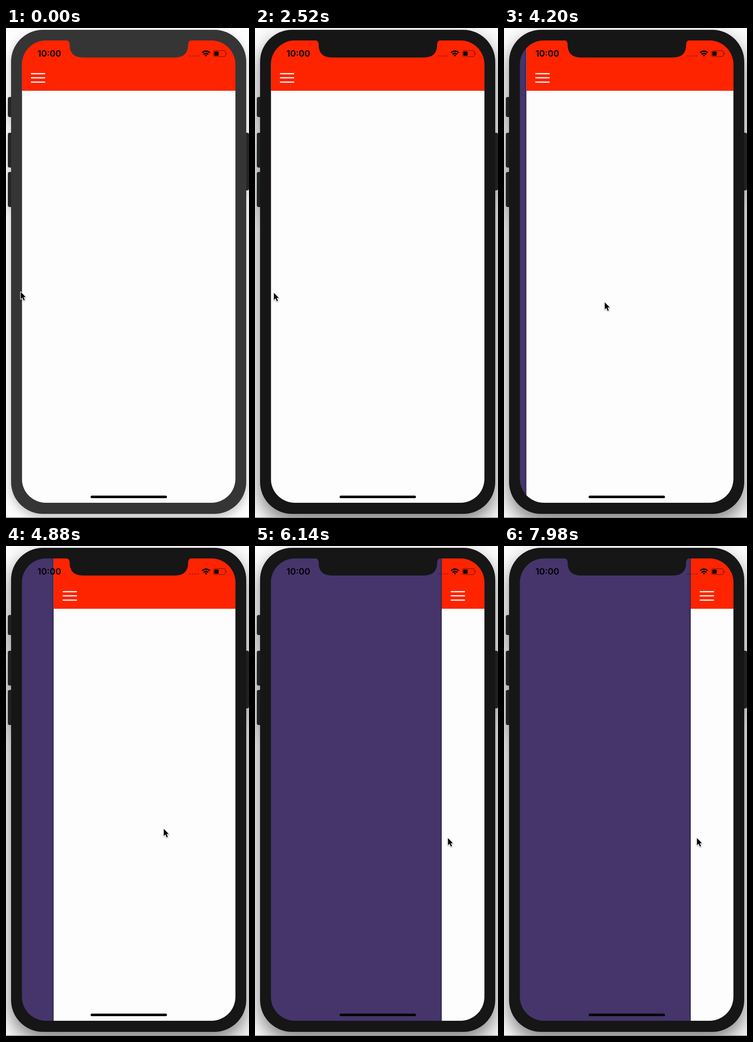
Recreate the animation shown at these times as an HTML page. Size 527 px wide and 1062 px high, loop 8 s.

```html
<!DOCTYPE html>
<html lang="en">
<head>
<meta charset="utf-8">
<title>Side menu drag</title>
<style>
html, body { margin: 0; width: 100%; height: 100%; overflow: hidden; background: #fdfdfd; }
svg { display: block; width: 100%; height: 100%; }
#phone { fill: #353535; filter: drop-shadow(0 8px 10px rgba(0, 0, 0, .24)); }
.active #phone { fill: #161616; filter: drop-shadow(0 18px 20px rgba(0, 0, 0, .5)); }
#buttons { fill: #242625; }
.active #buttons { fill: #202121; }
.active #notch { fill: #161616; }
#notch { fill: #353535; }
#page { filter: drop-shadow(0 0 2px rgba(0, 0, 0, .65)); }
#cursor { filter: drop-shadow(0 1px 1px rgba(0, 0, 0, .35)); }
text { font: 600 19px Inter, "Liberation Sans", sans-serif; }
</style>
</head>
<body>
<svg id="stage" viewBox="0 0 527 1062">
  <defs>
    <clipPath id="screen"><rect x="34.5" y="27" width="463" height="1002" rx="52"/></clipPath>
  </defs>

  <g id="phone">
    <g id="buttons">
      <rect x="4" y="149.5" width="14" height="43.5" rx="4"/>
      <rect x="4" y="227" width="14" height="75.5" rx="4"/>
      <rect x="4" y="312" width="14" height="76" rx="4"/>
      <rect x="513" y="227" width="14" height="125" rx="4"/>
    </g>
    <rect x="11" y="4" width="510" height="1049" rx="69"/>
  </g>

  <g clip-path="url(#screen)">
    <rect x="34" y="26" width="464" height="1004" fill="#45356b"/>
    <g id="page">
      <rect x="34.5" y="20" width="480" height="1020" fill="#fdfdfd"/>
      <rect x="34.5" y="20" width="480" height="116" fill="#fe2400"/>
      <path d="M54 99h31M54 108h31M54 117.3h31" stroke="#fff" stroke-width="2.6"/>
    </g>
  </g>
  <path id="notch" d="M128 26Q138 26 138 36Q138 64 167 64H366Q395 64 395 36Q395 26 405 26Z"/>

  <text x="94" y="62" text-anchor="middle">10:00</text>
  <path d="M398.5 60.5h20" stroke="#000" stroke-opacity=".22" stroke-width="4" stroke-linecap="round" stroke-dasharray="0 6.2"/>
  <g fill="none" stroke="#000" stroke-width="2.7">
    <path d="M425.2 53.6A12 12 0 0 1 442 53.6M428.4 57A7.4 7.4 0 0 1 438.8 57"/>
    <path d="M433.6 62L430.8 59.2A4 4 0 0 1 436.4 59.2Z" fill="#000" stroke="none"/>
  </g>
  <rect x="450" y="49.2" width="26" height="12.6" rx="3.6" fill="none" stroke="#000" stroke-opacity=".5" stroke-width="1.2"/>
  <rect x="451.8" y="51" width="9.4" height="9" rx="1.8"/>
  <path d="M477.8 53.2Q480.6 55.5 477.8 57.8Z" fill-opacity=".6"/>
  <rect x="183.5" y="1013.5" width="165.5" height="5.6" rx="2.8"/>

  <path id="cursor" d="M0 0V15.5L3.5 12.2L6.3 18.4L8.8 17.3L6.1 11.2H10.8Z"
    stroke="#fff" stroke-width="2.4" paint-order="stroke" stroke-linejoin="round"/>
  <rect y="1060.6" width="527" height="1.4" fill="#858585"/>
</svg>

<script>
const LOOP = 8000, FOCUS = 820;
const stage = document.getElementById("stage");
const page = document.getElementById("page");
const cursor = document.getElementById("cursor");

// Each key is [time, value].
const cursorX = [[0, 32], [700, 37], [2300, 37], [3340, 98.5], [4880, 342], [5260, 418.5]];
const cursorY = [[0, 572], [700, 573.5], [2300, 573.5], [3340, 580], [4880, 613], [5260, 633]];
const pageX = [[2900, 0], [3340, .5], [4200, 14], [4880, 68.7], [5220, 165], [5440, 324.7], [5660, 370.5]];

// Smooth curve through the keys that never overshoots.
function track(keys, t) {
  const last = keys.length - 1;
  if (t <= keys[0][0]) return keys[0][1];
  if (t >= keys[last][0]) return keys[last][1];
  const rate = i => (keys[i + 1][1] - keys[i][1]) / (keys[i + 1][0] - keys[i][0]);
  const slope = i => {
    if (i === 0 || i === last) return 0;
    const a = rate(i - 1), b = rate(i);
    return a * b > 0 ? 2 * a * b / (a + b) : 0;
  };
  const i = keys.findIndex(k => k[0] > t) - 1;
  const [t0, v0] = keys[i], [t1, v1] = keys[i + 1];
  const h = t1 - t0, u = (t - t0) / h, w = 1 - u;
  return v0 * w * w * (1 + 2 * u) + v1 * u * u * (3 - 2 * u)
    + h * u * w * (slope(i) * w - slope(i + 1) * u);
}

function move(el, x, y) {
  el.setAttribute("transform", `translate(${x} ${y})`);
}

function draw() {
  const t = performance.now() % LOOP;
  stage.classList.toggle("active", t >= FOCUS);
  move(page, track(pageX, t), 0);
  move(cursor, track(cursorX, t), track(cursorY, t));
  requestAnimationFrame(draw);
}
draw();
</script>
</body>
</html>
```
